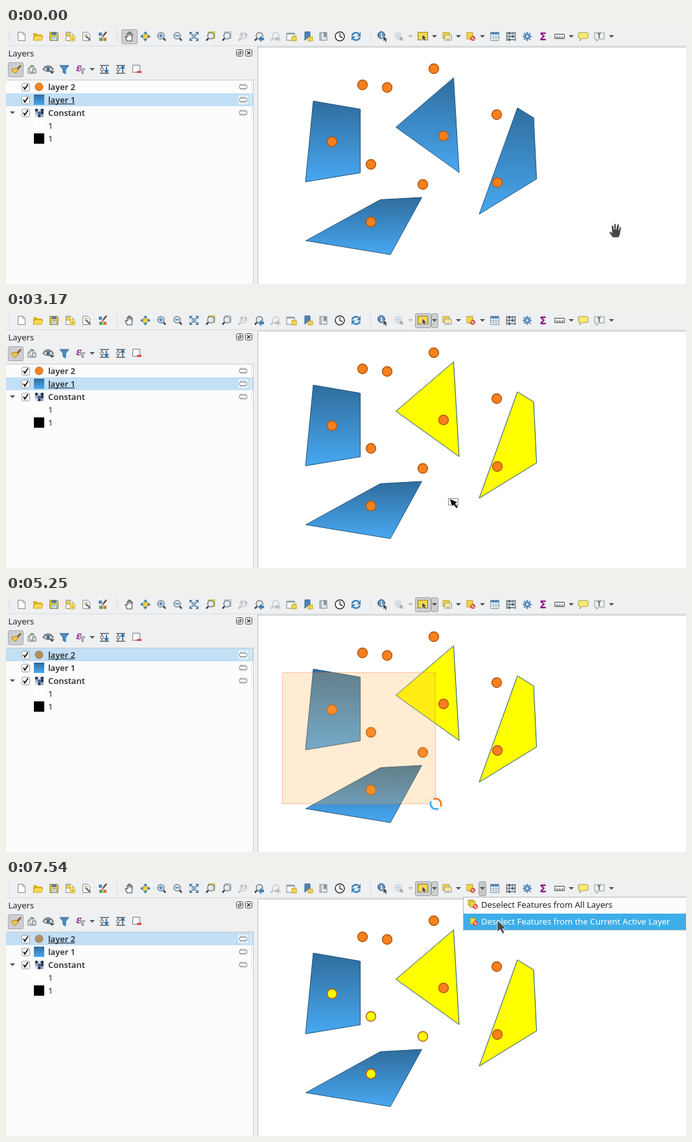
An HTML page with a canvas that plays this animation: 1049x396 px, repeating every 8000 ms.

```html
<!DOCTYPE html>
<html lang="en">
<head>
<meta charset="utf-8">
<title>Selecting map features</title>
<style>
html, body { margin: 0; width: 100%; height: 100%; overflow: hidden; background: #eff0f1; }
canvas { display: block; }
</style>
</head>
<body>
<canvas id="stage" width="1049" height="396"></canvas>
<script>
const ctx = document.getElementById('stage').getContext('2d');
const LOOP = 8000, INK = '#232629', BLUE = '#3daee9', PALE = '#c2dff5', YELLOW = '#ffff00';
const GOLD = '#f5d83d', GREY = '#6b7074', STEEL = '#5a8cbb', BROWN = '#b48c5e';
const FONT = '13px "Noto Sans", "Open Sans", sans-serif';
const BOLD = '600 13px "Open Sans", "Noto Sans", sans-serif';

// Cursor keys: time, x, y. Equal neighbours mean a rest.
const path = [
  [0, 940, 313], [210, 940, 313], [800, 650, 48], [880, 643, 29], [960, 644, 15], [1210, 644, 15],
  [1500, 643, 128], [1540, 643, 128], [2000, 837, 253], [3000, 837, 253], [3130, 750, 284],
  [3240, 550, 278], [3500, 118, 92], [3920, 118, 92], [4040, 318, 142], [4260, 527, 177],
  [4710, 426, 118], [4740, 426, 118], [5090, 663, 322], [5540, 663, 322], [6130, 749, 135],
  [6330, 747, 78], [6640, 736, 14], [7170, 736, 17], [7540, 758, 63], [8000, 758, 63]
];
const drags = [
  { from: 1540, busy: 2030, done: 2480, x: 643, y: 128 },
  { from: 4740, busy: 5100, done: 5310, x: 426, y: 118 }
];
const polygons = [
  { pts: [[474, 113], [546.5, 125.5], [546.5, 224], [462, 238]] },
  { pts: [[690.5, 77], [699, 223.5], [601.5, 153.5]], picked: true },
  { pts: [[789, 123.5], [814, 139], [818.5, 233.5], [730, 288]], picked: true },
  { pts: [[577.5, 265.5], [641.5, 262], [593, 350.5], [462.5, 329]] }
];
const points = [[550, 88], [588, 92], [660, 63], [757, 134], [503, 176],
  [675, 167], [563, 211], [643, 242], [758, 239], [563, 300]];

function cursorAt(t) {
  let i = 0;
  while (i < path.length - 2 && t >= path[i + 1][0]) i++;
  const a = path[i], b = path[i + 1], span = b[0] - a[0], u = (t - a[0]) / span;
  const same = (p, q) => !p || !q || (p[1] === q[1] && p[2] === q[2]);
  const slope = (k, c) => same(path[k - 1], path[k]) || same(path[k], path[k + 1]) ? 0
    : (path[k + 1][c] - path[k - 1][c]) / (path[k + 1][0] - path[k - 1][0]);
  const hermite = c => {
    if (same(a, b)) return a[c];
    const v = 1 - u;
    return a[c] * v * v * (1 + 2 * u) + b[c] * u * u * (3 - 2 * u)
      + span * u * v * (slope(i, c) * v - slope(i + 1, c) * u);
  };
  return [hermite(1), hermite(2)];
}

function rect(x, y, w, h, color) {
  ctx.fillStyle = color;
  ctx.fillRect(x, y, w, h);
}
function text(s, x, y, color = INK, font = FONT) {
  ctx.font = font;
  ctx.fillStyle = color;
  ctx.fillText(s, x, y);
}
function shape(d, fill, stroke, width = 1) {
  const p = d instanceof Path2D ? d : new Path2D(d);
  if (fill) { ctx.fillStyle = fill; ctx.fill(p); }
  if (stroke) { ctx.strokeStyle = stroke; ctx.lineWidth = width; ctx.stroke(p); }
}
function icon(x, y, ...parts) {
  ctx.save();
  ctx.translate(x, y);
  for (const part of parts) shape(...part);
  ctx.restore();
}
function disc(x, y, r, fill, stroke, width) {
  const p = new Path2D();
  p.arc(x, y, r, 0, 7);
  shape(p, fill, stroke, width);
}
function box(x, y, w, h, fill, stroke) {
  const p = new Path2D();
  p.roundRect(x + .5, y + .5, w, h, 2);
  shape(p, fill, stroke);
}
const faded = draw => { ctx.globalAlpha = .3; draw(); ctx.globalAlpha = 1; };
const dropdown = (x, y) => icon(x, y, ['M-4-2H4L0 2Z', '#4d5154']);
const grip = (x, y) => { for (let i = 0; i < 7; i++) rect(x + i % 2 * 2, y + i * 2.5, 1, 1, '#a5a8aa'); };

const page = ['M-5.5-6.5H2L5.5-3V6.5H-5.5Z', '#fff', '#85898c'];
const pointer = ['M0-1V8L2 6L4 9L6 8L4 5H7Z', '#444', '#fff', .6];
const denied = [['M3-1A4 4 0 1 0 3.1-1Z', '#e04a4a'], ['M1 1L5 5', null, '#fff', 1.5]];

function lens(x, mark, left) {
  const s = left ? -1 : 1;
  ctx.save();
  ctx.translate(x - s, 12);
  disc(0, 0, 5, '#e3ebf1', '#78838b', 1.5);
  shape(`M${s * 4} 4L${s * 7} 7.5`, null, '#3a3d40', 2.6);
  if (mark) shape(mark, null, STEEL, 2);
  ctx.restore();
}

function mainToolbar(t, x, y) {
  rect(0, 0, 1049, 28, '#eff0f1');
  rect(0, 27, 1049, 1, '#dcddde');
  [4, 170, 561].forEach(g => grip(g, 5));
  if (t < 1210) box(178, 2, 24, 22, '#cdcecf', '#a4a6a8');
  const overSelect = x > 631 && x < 667 && y < 26, overClear = x > 708 && x < 741 && y < 26;
  if (t >= 1040) {
    box(631, 2, 24, 22, '#cdcecf', '#a0a2a4');
    box(656, 2, 10, 22, '#cdcecf', '#a0a2a4');
  }
  if (overSelect) box(631, 2, 35, 22, null, BLUE);
  if (overClear) box(708, 2, 32, 22, null, BLUE);
  if (t >= 6980) box(729, 2, 11, 22, '#c6c7c8', '#a0a2a4');

  icon(24, 13, page, ['M2-6.5V-3H5.5', null, '#85898c']);
  icon(49, 13, ['M-7-5H-2L0-3H6V6H-7Z', '#dfb326'], ['M-5-1H8L6 6H-7Z', '#fbd955', '#c89d1c']);
  icon(74, 13, ['M-6.5-6.5H5L6.5-5V6.5H-6.5Z', '#f1cc3e', '#9a8a3a'], ['M-4-6H4V-2H-4Z', '#547fae'],
    ['M-4 1H4V6H-4Z', '#fff', STEEL], ['M-2 3.5H2', null, GREY]);
  icon(98, 13, page, ['M-4-5H1V0H-4Z', GOLD, '#c4a528'], ['M1-1H8V7H1Z', '#fff6b0', '#c4a528'], ['M4.5 1V6M2 3.5H7', null, '#e0b020', 2]);
  icon(124, 13, page, ['M-3-3H2M-3 0H0', null, STEEL], ['M-1-1L6 6', null, '#59636b', 2.4], ['M-4-2L0-2L-2 1Z', GOLD]);
  icon(149, 13, ['M-6-6H-1V-1H-6Z', '#4f89bd'], ['M-5 2H0V7H-5Z', '#57a773'], ['M1-1L6-7', null, '#5b4636', 2.4],
    ['M1 2H6V7H1Z', '#df7d35'], ['M-2 0L2-2L1 2Z', '#d15152']);
  icon(190, 13, ['M-3 7L-6 1Q-5-1-3 1V-4Q-2-6-1-4V-6Q0-8 1-6V-5Q2-7 3-5V-3Q5-5 5-2L4 7Z', '#fff', '#3b3e40', 1.1],
    ['M-1-4V0M1-5V0M3-4V0', null, '#55595c', .8]);
  icon(215, 13, ['M-3-3H3V3H-3Z', GOLD, '#b59e28'], ['M0-8L3-4H-3ZM0 8L3 4H-3ZM-8 0L-4-3V3ZM8 0L4-3V3Z', '#3f78ac']);
  lens(240, 'M-3 0H3M0-3V3');
  lens(265, 'M-3 0H3');
  icon(290, 13, ['M-3-3H3V3H-3Z', '#dce5ec', '#8a959d'],
    ['M-7-7H-2L-7-2ZM7-7H2L7-2ZM-7 7H-2L-7 2ZM7 7H2L7 2Z', '#3f6f9f'], ['M-6-6L6 6M6-6L-6 6', null, STEEL, 1.2]);
  icon(317, 11, ['M-5-5H5V5H-5Z', GOLD, '#b7a233']);
  lens(315, '', true);
  icon(342, 11, ['M-5-5H5V5H-5Z', '#f9f9f9', '#9a9da0']);
  lens(340, '', true);
  faded(() => { lens(365, '', true); text('1:1', 361, 14, INK, '600 8px "Noto Sans", sans-serif'); });
  lens(390, '', true);
  icon(394, 16, ['M-5 1L0-4V-1H4V3H0V6Z', '#4682b4']);
  faded(() => { lens(415, '', true); icon(419, 16, ['M5 1L0-4V-1H-4V3H0V6Z', GREY]); });
  icon(440, 13, ['M-7-5H5V6H-7Z', '#fff', '#777d82'], ['M-7-5H5V-3H-7Z', '#8c9aa5'], ['M1 0H8V7H1Z', GOLD, '#bda02b']);
  icon(465, 13, ['M-4-7H4V6L0 2L-4 6Z', '#4c82b5', '#345f88'], ['M1 1H8V7H1Z', GOLD, '#bda02b']);
  icon(490, 13, ['M-6-6H5V6H-6Z', '#e6e9eb', '#7e868c'], ['M0-6H4V2L2 0L0 2Z', '#8492a0'], ['M-4-6V6', null, '#7e868c']);
  disc(515, 13, 7, '#fff', '#2c2f31', 1.5);
  icon(515, 13, ['M0-5V0L4 2', null, '#2c2f31', 1.4]);
  icon(540, 13, ['M-6-1A6 6 0 0 1 4-4M6 1A6 6 0 0 1-4 4', null, '#3c83bd', 2.6], ['M7-7V0H1ZM-7 7V0H-1Z', '#3c83bd']);
  disc(579, 11, 5.5, STEEL, '#3c6890');
  text('i', 577.5, 15, '#fff', 'bold 10px "Noto Serif", serif');
  icon(582, 13, pointer);
  faded(() => { lens(606, 'M-3 0H3M0-3V3'); icon(609, 16, ['M-2-3L5 0L-2 4Z', GREY]); dropdown(624, 13); });
  ctx.setLineDash([2, 1]);
  icon(643, 13, ['M-7.5-6.5H7.5V5.5H-7.5Z', GOLD, '#54502d']);
  ctx.setLineDash([]);
  icon(642, 11, pointer);
  dropdown(661, 13);
  icon(680, 13, ['M-6-6H4V3H-6Z', GOLD, '#a99534'], ['M-3-2H7V6H-3Z', '#fffbe0', '#8c8c85'], ['M-1 0H5V1.5H-1Z', GOLD], ['M-1 4H5', null, '#8c8c85']);
  dropdown(698, 13);
  icon(717, 13, ['M-6-6H3V4H-6Z', GOLD, '#a99534'], ...denied);
  dropdown(735, 13);
  icon(754, 13, ['M-6.5-6.5H6.5V6.5H-6.5Z', '#fff', '#7893aa'], ['M-6-6H6V-3H-6Z', '#4f86b8'], ['M-6 0H6M-6 3H6M-2-3V6M2-3V6', null, '#8ca9c1']);
  icon(779, 13, ['M-6.5-7V7M6.5-7V7M-6-5H6M-6 0H6M-6 5H6', null, '#686c70', 1.4],
    ['M-4-7H-1V-3H-4ZM1-2H4V2H1ZM-4 3H-1V7H-4Z', '#506a82'], ['M1-7H4V-3H1ZM-4-2H-1V2H-4Z', '#83929e']);
  icon(804, 13, ['M0-7V7M-7 0H7M-5-5L5 5M5-5L-5 5', null, '#5c8dbd', 2.4]);
  disc(804, 13, 4.6, '#5c8dbd');
  disc(804, 13, 1.8, '#e8eef4');
  text('Σ', 823, 18.5, '#8d0c8d', 'bold 16px "DejaVu Sans", sans-serif');
  icon(854, 13, ['M-7.5-3.5H7.5V3.5H-7.5Z', '#c9cbcc', '#5e6265'], ['M-7-1H7', null, '#fff', 2], ['M-4 0V3M0 0V3M4 0V3', null, '#5e6265']);
  dropdown(872, 13);
  icon(890, 12, ['M-6-5H6Q8-5 8-3V2Q8 4 6 4H0L-5 8L-4 4H-5Q-7 4-7 2V-3Q-7-5-6-5Z', '#f4ec78', '#a69b49']);
  icon(915, 13, ['M-7-6H8V4H0L-4 8V4H-7Z', '#edf2ee', '#8a9791']);
  text('T', 912, 16, '#4b5c66', 'bold 10px "Noto Sans", sans-serif');
  dropdown(934, 13);
}

function panelToolbar() {
  text('Layers', 3.5, 44);
  box(355, 33, 10, 10, '#f7f7f7', '#484c4f');
  icon(360.5, 38.5, ['M-2.5-.5H1V2.5H-2.5ZM-1-2.5H2.5V1', null, '#303336']);
  box(369, 33, 10, 10, '#f7f7f7', '#484c4f');
  icon(374.5, 38.5, ['M-2.5-2.5L2.5 2.5M2.5-2.5L-2.5 2.5', null, '#303336', 1.6]);

  box(3, 53, 23, 22, '#cdcecf', '#a4a6a8');
  icon(15, 64, ['M2 0L8-6', null, '#8a5429', 2.6], ['M-7 0L1-2L4 1L0 6Q-4 6-7 0Z', '#f0c64a', '#b07d2a']);
  icon(40, 64, ['M-6-2H0V6H-6Z', '#f4f4f4', GREY], ['M-3-5H3V4H-3Z', '#fff', GREY], ['M1-1H6V6H1Z', '#ddd', GREY], ['M0-7V-2M-2-5H3', null, '#5b9c52', 1.5]);
  icon(65, 64, ['M-8 0Q0-8 8 0Q0 7-8 0Z', '#fff', '#53585c', 1.2], ['M-7-3Q0-9 7-3', null, GREY]);
  disc(65, 64, 3, '#4d6f8c');
  dropdown(71, 69);
  icon(90, 64, ['M-7-6H7L2 0V7L-2 5V0Z', '#4b8ec8', '#2f6796']);
  text('ε', 108, 67, '#8d2a8d', 'italic bold 16px "Noto Serif", serif');
  icon(118, 66, ['M-3-3H4L1 0V5L-1 4V0Z', '#ddd', GREY]);
  dropdown(133, 64);
  for (const [x, arrow] of [[152, 'M3-4V4M0 1L3 5L6 1'], [177, 'M3 5V-4M0-1L3-5L6-1']])
    icon(x, 64, ['M-7-6H7M-7 6H7M-4-6V6', null, '#5c6165', 1.3], ['M-6-2H-2V2H-6Z', '#fff', '#5c6165'], [arrow, null, '#2f6ea5', 1.8]);
  icon(201, 63, ['M-5.5-5.5H5.5V5.5H-5.5Z', '#fafafa', '#777c80'], ['M1 5H8', null, '#dc3d3d', 3]);
}

function layerRow(y, label, active, focused) {
  if (active) {
    rect(0, y - 10, 381, 20, focused ? BLUE : PALE);
    rect(377, y - 9, 1, 18, '#fff');
  } else rect(378, y - 9, 1, 18, '#e2e3e4');
  box(24, y - 6, 12, 12, '#fff', '#999c9f');
  icon(30, y, ['M-3 0L-1 3.5L4-4', null, '#111', 1.8]);
  const color = focused ? '#fff' : INK;
  text(label, 65, y + 4.5, color, BOLD);
  if (active) rect(65, y + 6, 41, 1, color);
  if (active) box(358, y - 7, 15, 13, '#f4f8fb');
  icon(366, y, ['M-5.5-2.5H5.5V2.5H-5.5Z', '#fff', '#85898c'], ['M-3.5-5V-3M-.5-5V-3M2.5-5V-3M-3.5 3V5M-.5 3V5M2.5 3V5', null, '#85898c']);
}

function ramp(top, bottom) {
  const g = ctx.createLinearGradient(0, top, 0, bottom);
  g.addColorStop(0, '#2f6d9e');
  g.addColorStop(1, '#48a8f1');
  return g;
}

function layersPanel(t) {
  panelToolbar();
  rect(0, 80, 382, 316, '#fcfcfc');
  rect(0, 80, 382, 1, '#c6c8c9');
  rect(381, 80, 1, 316, '#c6c8c9');
  const second = t >= 3920;
  layerRow(91, 'layer 2', second, second && t < 4710);
  layerRow(111, 'layer 1', !second, false);
  layerRow(131, 'Constant', false, false);
  disc(51, 91, 6, second ? BROWN : '#f9821e', second ? '#a27f5c' : '#c46417');
  rect(43, 103, 16, 16, ramp(103, 119));
  dropdown(10, 131);
  const shades = ['#263751', '#8fa9cb', '#d5deea', '#405f8b'];
  for (let i = 0; i < 9; i++) rect(45 + i % 3 * 4.3, 125 + Math.floor(i / 3) * 4.3, 4.3, 4.3, shades[i * 2 % 5 % 4]);
  rect(43, 143, 16, 16, '#fff');
  rect(43, 163, 16, 16, '#000');
  text('1', 65, 156);
  text('1', 65, 176);
}

function map(t, x, y) {
  rect(388, 29, 661, 367, '#b9bbbc');
  rect(389, 30, 660, 366, '#fff');
  ctx.lineJoin = 'round';
  for (const { pts, picked } of polygons) {
    const ys = pts.map(p => p[1]);
    const fill = picked && t >= drags[0].done ? YELLOW : ramp(Math.min(...ys), Math.max(...ys));
    shape('M' + pts.join('L') + 'Z', fill, '#23547c');
  }
  ctx.lineJoin = 'miter';
  for (const [px, py] of points) {
    const picked = t >= drags[1].done && px > 426 && px < 663 && py > 118 && py < 322;
    disc(px, py, 7.5, picked ? YELLOW : '#f9801d', '#b0560f', 1.4);
  }
  const drag = drags.find(d => t >= d.from && t < d.done);
  if (!drag) return;
  const w = Math.round(x - drag.x), h = Math.round(y - drag.y);
  rect(drag.x, drag.y, w, h, 'rgba(254,178,76,.247)');
  ctx.strokeStyle = 'rgba(254,58,29,.5)';
  ctx.lineWidth = 1;
  ctx.setLineDash([1, 1]);
  ctx.strokeRect(drag.x + .5, drag.y + .5, w - 1, h - 1);
  ctx.setLineDash([]);
}

function menu(x, y) {
  rect(705, 26, 344, 52, '#b5b7b8');
  rect(706, 27, 343, 50, '#fcfcfc');
  const hover = y < 26 ? -1 : y < 51 ? 0 : 1;
  ['Deselect Features from All Layers', 'Deselect Features from the Current Active Layer'].forEach((label, i) => {
    const top = 26 + i * 26;
    if (hover === i) rect(706, top, 343, 25, BLUE);
    if (!i) icon(719, 37, ['M-6-6H2V2H-6Z', GOLD, '#a99534']);
    icon(721, top + 12, ['M-5-5H3V4H-5Z', GOLD, '#a99534'], ...denied);
    text(label, 733, top + 17, hover === i ? '#fff' : INK);
  });
}

function busyRing(t, x, y) {
  disc(x, y, 11, 'rgba(60,60,60,.14)');
  disc(x, y, 10, '#fff');
  ctx.lineWidth = 2.4;
  const turn = (t - 2210) / 868.6 * 2 * Math.PI - Math.PI / 4;
  ['#2ea7ec', '#f3740f'].forEach((color, i) => {
    const mid = turn + i * Math.PI;
    ctx.strokeStyle = color;
    ctx.beginPath();
    ctx.arc(x, y, 8, mid - 1.3, mid + 1.3);
    ctx.stroke();
  });
}

function cursor(t, x, y) {
  const onMap = x > 388 && y > 27 && t < 6980;
  if (drags.some(d => t >= d.busy && t < d.done)) busyRing(t, x, y - .5);
  else if (!onMap) icon(x, y, ['M0-1V17L4.5 13.5L8 20L11 18.5L8 12.5L12.5 11.5Z', '#4a4a4a', '#f4f4f4', .8]);
  else if (t < 1210) {
    icon(x, y, ['M-4 11L-9 4Q-10 1-7 2L-5 4L-6-6Q-5-9-3-7L-2-1V-9Q0-12 1-9V-1L3-9Q5-11 6-8L5 0L7-5Q9-7 9-4L7 7L5 11Z', '#444', '#f4f4f4', .7]);
  } else {
    ctx.setLineDash([1, 1]);
    icon(Math.round(x), Math.round(y), ['M-1.5-.5H13.5V9.5H-1.5Z', null, '#111']);
    ctx.setLineDash([]);
    icon(x, y, ['M0 0L3.5 12L6 9.5L10.5 15L13 12.5L8.5 8L12 5.5Z', '#000', '#fff', .7]);
  }
}

function draw() {
  const t = performance.now() % LOOP;
  const [x, y] = cursorAt(t);
  rect(0, 0, 1049, 396, '#eff0f1');
  mainToolbar(t, x, y);
  layersPanel(t);
  map(t, x, y);
  if (t >= 6980) menu(x, y);
  cursor(t, x, y);
  requestAnimationFrame(draw);
}
draw();
</script>
</body>
</html>
```
